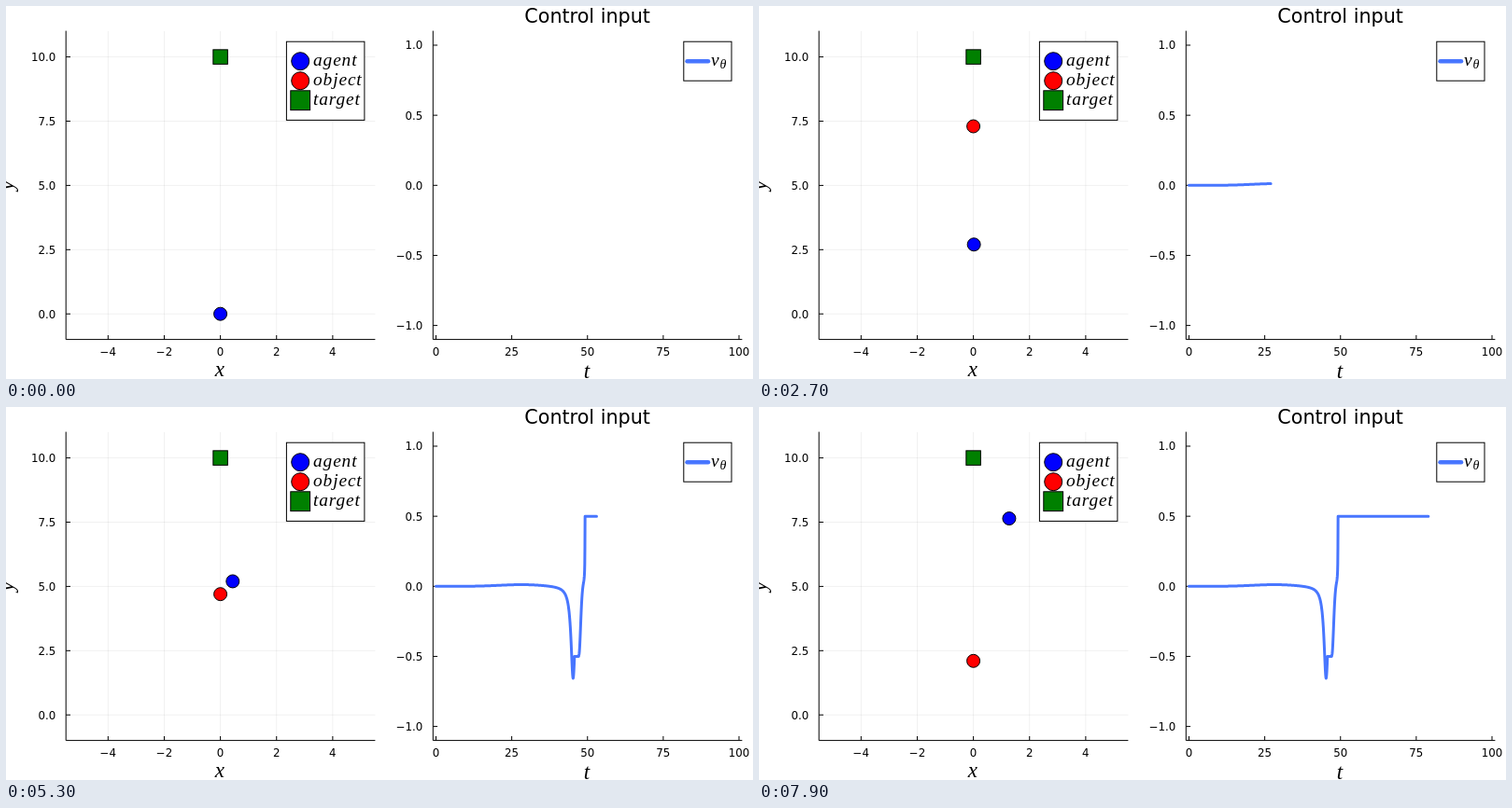
Animation of 800x400 px, one loop 8 s. Source, as an HTML page:

```html
<!DOCTYPE html>
<html lang="en">
<head>
<meta charset="utf-8">
<title>Control input</title>
<style>
  html, body { margin: 0; width: 100%; height: 100%; overflow: hidden; background: #fff; }
  svg { display: block; width: 800px; height: 400px; }
  text { font-family: "DejaVu Sans", sans-serif; font-size: 11.8px; }
  .title { font-size: 20.7px; }
  .math { font-family: "Liberation Serif", "Times New Roman", serif; font-style: italic; font-size: 19.4px; letter-spacing: .045em; }
  .axis { font-size: 23px; letter-spacing: 0; }
  .sub { font-size: 14px; }
  .mid { text-anchor: middle; }
  .end { text-anchor: end; }
  .grid { stroke: #000; stroke-opacity: .1; stroke-width: .6; }
  .line, .mark { stroke: #000; stroke-width: 1; }
  .line { fill: none; }
  .box { fill: #fff; stroke: #000; stroke-width: 1; }
  .curve { fill: none; stroke: #4876ff; stroke-width: 3; stroke-linecap: round; stroke-linejoin: round; }
  .key { stroke-width: 4.6; }
</style>
</head>
<body>
<svg id="stage" viewBox="0 0 800 400"></svg>
<script>
const NS = "http://www.w3.org/2000/svg";
const stage = document.getElementById("stage");
const STEP = 100, STEPS = 80;

function add(tag, attrs, label) {
  const el = document.createElementNS(NS, tag);
  for (const key in attrs) el.setAttribute(key, attrs[key]);
  if (label !== undefined) el.textContent = label;
  stage.appendChild(el);
  return el;
}
const path = (cls, d) => add("path", { class: cls, d });
const text = (cls, x, y, label) => add("text", { class: cls, x, y }, label);
const circle = (cx, cy, r, fill) => add("circle", { class: "mark", cx, cy, r, fill });
const square = (cx, cy, size, fill) => add("rect", {
  class: "mark", x: cx - size / 2, y: cy - size / 2, width: size, height: size, fill
});
const frame = (x, y, width, height) => add("rect", { class: "box", x, y, width, height });

const posX = x => 229.6 + x * 30.07;
const posY = y => 330.2 - y * 27.56;
const timeX = t => 460.5 + t * 3.245;
const ctrlY = v => 192.3 - v * 150.3;
const signed = (v, digits) => v.toFixed(digits).replace("-", "\u2212");
const ticks = (first, step) => Array.from({ length: 5 }, (_, i) => first + i * step);

function axes(left, right, xs, ys, toX, toY, grid) {
  if (grid) {
    xs.forEach(x => path("grid", `M${toX(x)} 27V357.6`));
    ys.forEach(y => path("grid", `M${left} ${toY(y)}H${right}`));
  }
  path("line", `M${left} 26.6V357.6H${right}`);
  xs.forEach(x => {
    path("line", `M${toX(x)} 357.6v-4.6`);
    text("mid", toX(x), 375, signed(x, 0));
  });
  ys.forEach(y => {
    path("line", `M${left} ${toY(y)}h4.8`);
    text("end", left - 11, toY(y) + 4.4, signed(y, 1));
  });
}

axes(64.2, 395.4, ticks(-4, 2), ticks(0, 2.5), posX, posY, true);
axes(457.3, 788.4, ticks(0, 25), ticks(-1, .5), timeX, ctrlY, false);
text("title mid", 622.6, 18.2, "Control input");
text("math axis mid", 228.8, 397.3, "x");
text("math axis mid", 622, 399.3, "t");
add("text", { class: "math axis mid", transform: "translate(8 192.5) rotate(-90)" }, "y");

const agent = circle(0, 0, 7, "#00f");
const object = circle(posX(0), 0, 7, "#f00");
square(posX(0), posY(10), 15.5, "#008000");
const curve = path("curve", "");

frame(300.4, 38.2, 83.5, 84.2);
["agent", "object", "target"].forEach((name, i) => {
  const y = 59.2 + i * 21;
  if (name === "target") square(315.2, y, 20.8, "#008000");
  else circle(315.2, y, 9.5, name === "agent" ? "#00f" : "#f00");
  text("math", 329, 64 + i * 20.8, name);
});
frame(725.8, 38.2, 51.2, 42);
path("curve key", "M729.6 59.2H752");
text("math", 755, 64, "v");
text("math sub", 764.5, 66.8, "θ");

const bell = (t, mid, width) => Math.exp(-(((t - mid) / width) ** 2));

// Slow drift, resonant dip, hold, then a steep climb to the upper limit
function control(t) {
  if (t < 45.7) return .0135 * bell(t, 29, 11) - .657 / (1 + ((t - 45.25) / .827) ** 2);
  if (t < 47.15) return -.5;
  if (t < 49.18) return .02 / (49.22 - t) - .5 * bell(t, 47.15, .8);
  return .5;
}

function curveTo(end) {
  if (!end) return "";
  const pts = [];
  for (let i = 0; i <= end * 20; i++) {
    pts.push(`${timeX(i / 20).toFixed(2)} ${ctrlY(control(i / 20)).toFixed(2)}`);
  }
  return "M" + pts.join("L");
}

// Angle between the agent's heading and its bearing to the goal
const swerve = n => .008 + .587 / (1 + Math.exp((44.7 - n) / .9));

const track = [[0, 0]];
for (let n = 0; n < STEPS - 1; n++) {
  const [x, y] = track[n];
  const heading = swerve(n) - Math.atan2(x, 10 - y);
  track.push([x + .1 * Math.sin(heading), y + .1 * Math.cos(heading)]);
}

let shown = -1;
function draw(now) {
  const n = Math.floor(now / STEP) % STEPS;
  if (n === shown) return;
  shown = n;
  agent.setAttribute("cx", posX(track[n][0]));
  agent.setAttribute("cy", posY(track[n][1]));
  object.setAttribute("cy", posY(10 - n / 10));
  curve.setAttribute("d", curveTo(n));
}

const start = performance.now();
function tick() {
  draw(performance.now() - start);
  requestAnimationFrame(tick);
}
tick();
</script>
</body>
</html>
```
